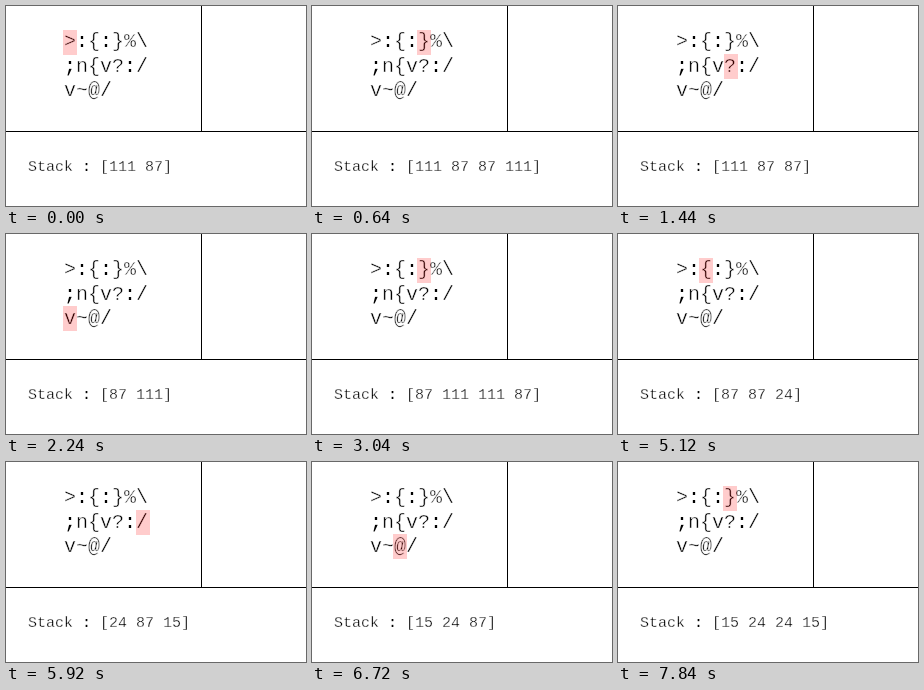
An HTML page with a canvas that plays this animation: 300x200 px, repeating every 8 s.

```html
<!DOCTYPE html>
<html lang="en">
<head>
<meta charset="utf-8">
<style>
  html, body { margin: 0; width: 100%; height: 100%; overflow: hidden; background: #fff; }
  canvas { display: block; width: 300px; height: 200px; }
</style>
</head>
<body>
<canvas id="stage" width="300" height="200"></canvas>
<script>
const STEP_MS = 160, STEPS = 50;
const FONT = '"Liberation Mono", monospace';
const ROWS = [
  { code: ">:{:}%\\", baseline: 41, cursorLeft: 57, cursorTop: 24 },
  { code: ";n{v?:/", baseline: 66, cursorLeft: 58, cursorTop: 48 },
  { code: "v~@/", baseline: 90, cursorLeft: 57, cursorTop: 72 }
];

const ctx = document.getElementById("stage").getContext("2d");

// Each operation changes the stack in place.
const operations = {
  ":": s => s.push(s.at(-1)),
  "{": s => s.push(s.shift()),
  "}": s => s.unshift(s.pop()),
  "%": s => { const b = s.pop(), a = s.pop(); s.push(a % b); },
  "@": s => s.splice(-3, 0, s.pop()),
  "~": s => s.pop()
};

// Run the program once, recording the cursor and stack after every step.
function trace(stack) {
  const states = [];
  let x = 0, y = 0, dx = 1, dy = 0;
  for (let i = 0; i < STEPS; i++) {
    const op = ROWS[y].code[x];
    let stride = 1;
    if (op === ">") [dx, dy] = [1, 0];
    else if (op === "v") [dx, dy] = [0, 1];
    else if (op === "/") [dx, dy] = [-dy, -dx];
    else if (op === "\\") [dx, dy] = [dy, dx];
    else if (op === "?") stride = stack.pop() ? 1 : 2;
    else operations[op](stack);
    states.push({ x, y, text: `Stack : [${stack.join(" ")}]` });
    x += dx * stride;
    y = (y + dy * stride) % ROWS.length;
  }
  return states;
}

const states = trace([111, 87]);

// A fine white outline thins the strokes; colons and semicolons stay heavy.
function thinText(text, x, y, size) {
  ctx.font = `${size}px ${FONT}`;
  ctx.fillStyle = "#000";
  ctx.fillText(text, x, y);
  ctx.strokeStyle = "#fff";
  ctx.lineWidth = size * 0.025;
  ctx.lineJoin = "round";
  ctx.strokeText(text.replace(/[:;]/g, " "), x, y);
}

function draw({ x, y, text }) {
  ctx.fillStyle = "#fff";
  ctx.fillRect(0, 0, 300, 200);

  for (const { code, baseline } of ROWS) thinText(code, 58, baseline, 20);
  thinText(text, 22, 165, 15);

  ctx.fillRect(195, 0, 1, 125);
  ctx.fillRect(0, 125, 300, 1);

  // The translucent cursor tints the character beneath it.
  const { cursorLeft, cursorTop } = ROWS[y];
  ctx.fillStyle = "rgba(255, 0, 0, 0.2)";
  ctx.fillRect(cursorLeft + 12 * x, cursorTop, 14, 25);
}

function play() {
  draw(states[Math.floor(performance.now() / STEP_MS) % STEPS]);
  requestAnimationFrame(play);
}
play();
</script>
</body>
</html>
```
